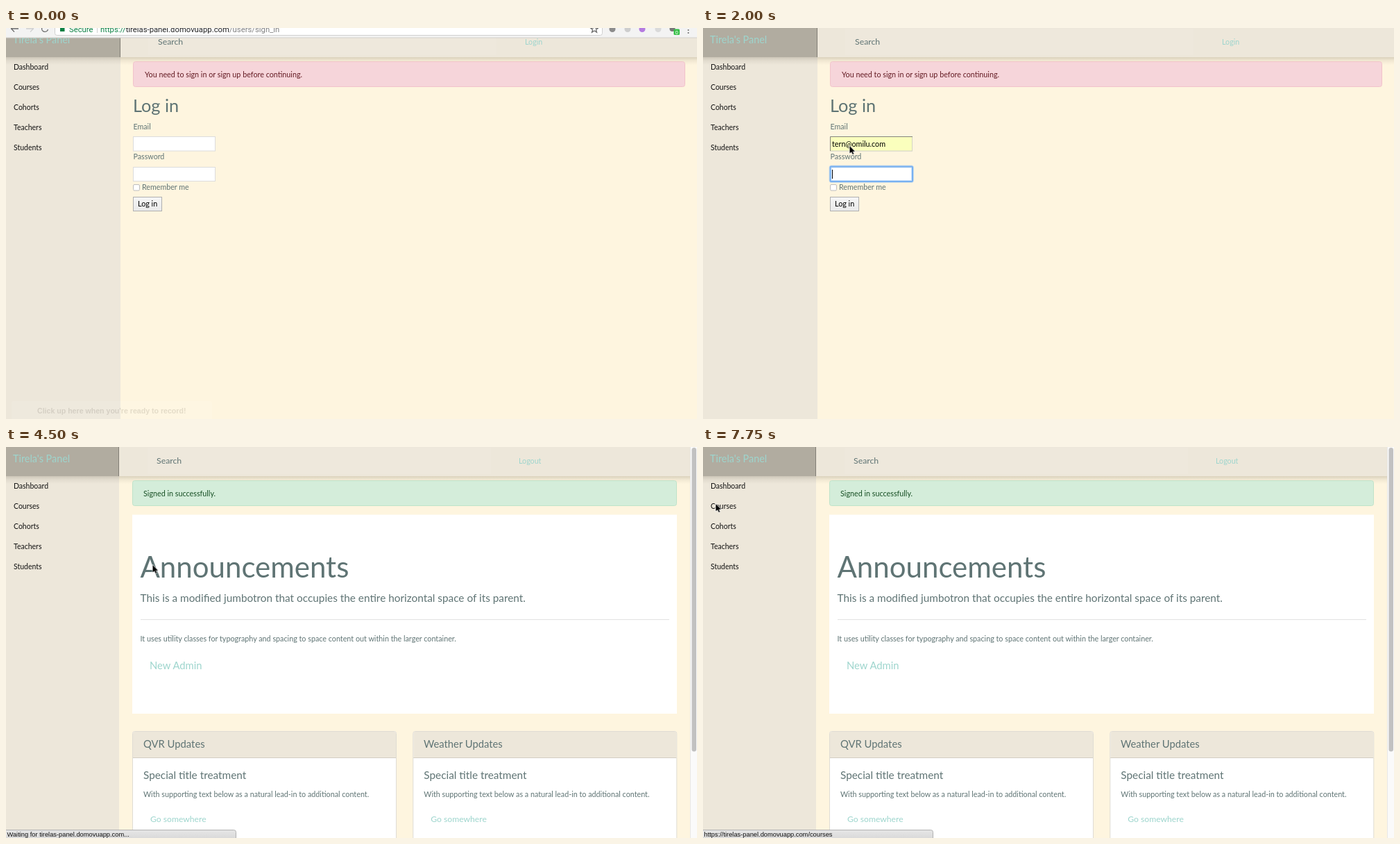
Animation, 996 px wide and 563 px high, one loop 8000 ms. Source, as an HTML page:

```html
<!DOCTYPE html>
<html lang="en">
<head>
<meta charset="utf-8">
<title>Panel sign-in</title>
<style>
html, body { margin: 0; width: 100%; height: 100%; overflow: hidden; background: #fef5df; }
svg { display: block; width: 996px; height: 563px; }
text { font: 10.77px Lato, "Open Sans", sans-serif; fill: #5f7474; white-space: pre; }
.nav text { font-size: 10.5px; fill: #111; }
.label { font-size: 10.7px; }
.dark { fill: #000; }
.link { fill: #9dd5cd; }
.brand { font-size: 14.4px; }
.search { font-size: 12.3px; }
.h1 { font-size: 42px; }
.h2 { font-size: 25.3px; }
.lead { font-size: 15.35px; }
.title { font-size: 14.8px; }
.go { font-size: 12.15px; }
.field { fill: #fff; stroke: #dcdcdc; }
.ring rect { fill: none; stroke: #78b1f1; stroke-width: 2; }
.ring .halo { stroke: #8fc0f5; stroke-width: 4; opacity: .45; }
.caret { fill: #000; }
.menu text { font: bold 10.4px "Liberation Sans", Arial, sans-serif; fill: #000; }
.status text { font: 9.3px "Liberation Sans", Arial, sans-serif; fill: #111; }
.bar text { font: 11.3px Roboto, sans-serif; fill: #222; }
.bar .ok { fill: #0b8043; }
.bar .path { fill: #808080; }
.hint text { font: bold 10.6px "Liberation Sans", Arial, sans-serif; fill: #000; }

/* Hard changes on a 250 ms grid: 3.125% is one step of the 8 s loop. */
.t { animation: 8s step-end infinite; }
.bar { animation-name: bar; }
.hint { animation-name: hint; }
.login { animation-name: login; }
.panel { animation-name: panel; }
.ring-email { animation-name: ring-email; }
.ring-pass { animation-name: ring-pass; }
.caret-email { animation-name: caret-email; }
.typed { animation-name: typed; }
.menu { animation-name: menu; }
.pick { animation-name: pick; }
.filled { animation-name: filled; }
.cover { animation-name: type-pass; }
.caret-pass { animation-name: caret-pass; }
.sent { animation-name: sent; }
.waiting { animation-name: waiting; }
.hover { animation-name: hover; }
.course { animation-name: course; }
.cursor { animation-name: cursor; }

@keyframes bar { 0% { opacity: 1 } 3.125% { opacity: 0 } }
@keyframes hint { 0% { opacity: .1 } 3.125% { opacity: .04 } 6.25% { opacity: 0 } }
@keyframes login { 0% { opacity: 1 } 56.25% { opacity: 0 } }
@keyframes panel { 0% { opacity: 0 } 56.25% { opacity: 1 } }
@keyframes ring-email { 0% { opacity: 0 } 9.375% { opacity: 1 } 25% { opacity: 0 } }
@keyframes ring-pass { 0% { opacity: 0 } 25% { opacity: 1 } }
@keyframes caret-email { 0% { opacity: 0 } 9.375% { opacity: 1 } 15.625% { opacity: 0 } }
@keyframes typed { 0% { opacity: 0 } 15.625% { opacity: 1 } 18.75% { opacity: 0 } }
@keyframes menu { 0% { opacity: 0 } 15.625% { opacity: 1 } 21.875% { opacity: 0 } }
@keyframes pick { 0% { opacity: 0 } 18.75% { opacity: 1 } }
@keyframes filled { 0% { opacity: 0 } 18.75% { opacity: 1 } }
@keyframes type-pass {
  0% { transform: none }
  31.25% { transform: translateX(4.95px) }
  34.375% { transform: translateX(14.85px) }
  37.5% { transform: translateX(19.8px) }
  40.625% { transform: translateX(29.7px) }
  43.75% { transform: translateX(34.6px) }
  46.875% { transform: translateX(39.6px) }
}
@keyframes caret-pass { 0% { opacity: 0 } 25% { opacity: 1 } 46.875% { opacity: 0 } }
@keyframes sent { 0% { opacity: 0 } 50% { opacity: 1 } }
@keyframes waiting { 0% { opacity: 0 } 53.125% { opacity: 1 } 65.625% { opacity: 0 } }
@keyframes hover { 0% { opacity: 0 } 75% { opacity: 1 } }
@keyframes course { 0% { opacity: 0 } 81.25% { opacity: 1 } }
@keyframes cursor {
  0% { opacity: 0; transform: translate(211.5px, 170px) }
  6.25% { opacity: 1; transform: translate(211.5px, 170px) }
  62.5% { opacity: 1; transform: translate(142px, 132px) }
  65.625% { opacity: 1; transform: translate(48px, 80px) }
  68.75% { opacity: 1; transform: translate(23.5px, 65px) }
  71.875% { opacity: 1; transform: translate(23.5px, 62px) }
  75% { opacity: 1; transform: translate(23.5px, 59px) }
  78.125% { opacity: 1; transform: translate(23px, 62px) }
  81.25% { opacity: 1; transform: translate(21px, 72px) }
  84.375% { opacity: 1; transform: translate(19px, 79px) }
  87.5% { opacity: 1; transform: translate(18.5px, 82px) }
}
</style>
</head>
<body>
<svg viewBox="0 0 996 563">
  <defs>
    <linearGradient id="shade" x2="0" y2="1">
      <stop offset="0" stop-color="#6b6350" stop-opacity=".24"/>
      <stop offset=".45" stop-color="#6b6350" stop-opacity=".09"/>
      <stop offset="1" stop-color="#6b6350" stop-opacity="0"/>
    </linearGradient>
    <linearGradient id="button" x2="0" y2="1">
      <stop offset="0" stop-color="#f6f6f6"/>
      <stop offset="1" stop-color="#eaeaea"/>
    </linearGradient>
    <linearGradient id="grey" x2="0" y2="1">
      <stop offset="0" stop-color="#e6e6e6"/>
      <stop offset="1" stop-color="#d9d9d9"/>
    </linearGradient>
    <g id="ring" class="ring">
      <rect class="halo" x="183.5" y="156" width="118.5" height="21.5" rx="2"/>
      <rect x="183.5" y="156" width="118.5" height="21.5" rx="1"/>
    </g>
    <path id="tab" d="M-1 564V551.5H328.5Q331.5 551.5 331.5 554.5V564Z" fill="url(#grey)" stroke="#b2b2b2"/>
    <g id="card">
      <rect x="182.5" y="409.5" width="380" height="170" rx="3" fill="#fff" stroke="#dfdcd4"/>
      <path d="M183 448V412q0-2 2-2h375q2 0 2 2v36Z" fill="#ede7da"/>
      <path d="M183 447.5H562" stroke="#d3cec2"/>
      <text class="lead" x="198" y="478">Special title treatment</text>
      <text x="198" y="503.5">With supporting text below as a natural lead-in to additional content.</text>
      <text class="go link" x="208" y="539.5">Go somewhere</text>
    </g>
  </defs>

  <rect width="996" height="563" fill="#fef5df"/>

  <g class="t login">
    <rect width="165" height="563" fill="#ede7da"/>
    <rect x="165" width="831" height="42" fill="#ede7da"/>
    <rect x="205" y="1" width="502" height="38" fill="#eee8dc"/>
    <rect width="165" height="42" fill="#b1aca0"/>
    <rect x="164" width="1" height="42" fill="#827e76"/>
    <rect y="42" width="996" height="11" fill="url(#shade)"/>
    <text class="search" x="219" y="24">Search</text>
    <text class="label link" x="748" y="24">Login</text>

    <rect x="183.5" y="48.5" width="795" height="36" rx="3" fill="#f6d5da" stroke="#f1c3ca"/>
    <text x="200" y="70.5" style="fill:#641b23">You need to sign in or sign up before continuing.</text>
    <text class="h2" x="183" y="120.5">Log in</text>

    <text class="label" x="183.5" y="145.5">Email</text>
    <rect class="field" x="183.5" y="156.5" width="118" height="20.5"/>
    <text class="label" x="183.5" y="189">Password</text>
    <rect class="field" x="183.5" y="200.5" width="118" height="20"/>
    <rect x="183.5" y="225.5" width="9" height="8.5" rx="1.5" fill="#fff" stroke="#bdbdbd"/>
    <text class="label" x="196" y="233">Remember me</text>
    <rect x="183.5" y="243.5" width="41" height="20" fill="url(#button)" stroke="#b0b0b0"/>
    <text class="dark" x="190" y="257">Log in</text>
    <g class="t sent">
      <rect x="183.5" y="243.5" width="41" height="20" fill="#f4efe4" stroke="#d3cec3"/>
      <text x="190" y="257" style="fill:#85857f">Log in</text>
    </g>

    <path d="M188.6 210.5H224" stroke="#000" stroke-width="3.5" stroke-linecap="round" stroke-dasharray="0 4.95"/>
    <g class="t cover">
      <rect x="186" y="203" width="70" height="15" fill="#fff"/>
      <rect class="t caret caret-pass" x="186" y="204" width="1" height="13"/>
    </g>
    <g class="t ring-pass"><use href="#ring" y="43.5"/></g>

    <g class="t filled">
      <rect x="183.5" y="156.5" width="118" height="20.5" fill="#faffbd" stroke="#d5d5c4"/>
      <path d="M183.5 177V156.5H302" fill="none" stroke="#85857c"/>
      <text class="dark" x="186" y="170.5">tern@omilu.com</text>
    </g>
    <g class="t ring-email"><use href="#ring"/></g>
    <rect class="t caret caret-email" x="186" y="160" width="1" height="13"/>
    <g class="t typed">
      <text class="dark" x="186" y="170.5">te</text>
      <rect class="caret" x="195" y="160" width="1" height="13"/>
    </g>
    <g class="t menu">
      <rect x="183.5" y="178.5" width="118.5" height="37.5" fill="#fff" stroke="#a9cdf0"/>
      <rect class="t pick" x="184" y="179" width="117.5" height="18" fill="#dcdcdc"/>
      <text x="190.5" y="191.5">tern@omilu.com</text>
      <text x="190.5" y="210.5">teacup@omilu.com</text>
    </g>
  </g>

  <g class="t panel">
    <rect width="996" height="563" fill="#fef5df"/>
    <rect width="163" height="563" fill="#ede7da"/>
    <rect x="163" width="823" height="42" fill="#ede7da"/>
    <rect x="204" y="1" width="495" height="38" fill="#eee8dc"/>
    <rect width="163" height="42" fill="#b1aca0"/>
    <rect x="162" width="1" height="42" fill="#827e76"/>
    <rect y="42" width="986" height="11" fill="url(#shade)"/>
    <text class="search" x="217" y="24">Search</text>
    <text class="label link" x="739" y="24">Logout</text>

    <rect x="182.5" y="48.5" width="784" height="36" rx="3" fill="#d4edda" stroke="#bfe3c9"/>
    <text x="198" y="70.5" style="fill:#174f24">Signed in successfully.</text>

    <rect x="182" y="97.5" width="785" height="286.5" fill="#fff"/>
    <text class="h1" x="193.5" y="188">Announcements</text>
    <text class="lead" x="193.5" y="222.5">This is a modified jumbotron that occupies the entire horizontal space of its parent.</text>
    <path d="M194 248.5H956" stroke="#e2e2e2"/>
    <text x="193.5" y="279.5">It uses utility classes for typography and spacing to space content out within the larger container.</text>
    <text class="title link" x="207" y="320">New Admin</text>

    <use href="#card"/>
    <use href="#card" x="404.3"/>
    <text class="title" x="198" y="433">QVR Updates</text>
    <text class="title" x="602" y="433">Weather Updates</text>

    <rect x="986" width="10" height="563" fill="#fafafa"/>
    <path d="M986.5 0V563" stroke="#e8e8e8"/>
    <rect x="988.5" y="1" width="6.5" height="437.5" rx="3.2" fill="#c1c1c1"/>
  </g>

  <text class="brand link" x="10" y="22">Tirela's Panel</text>
  <g class="nav">
    <text x="11" y="60">Dashboard</text>
    <text x="11" y="89">Courses</text>
    <text x="11" y="118">Cohorts</text>
    <text x="11" y="147">Teachers</text>
    <text x="11" y="176">Students</text>
  </g>

  <g class="t status waiting">
    <use href="#tab"/>
    <text x="1.5" y="561">Waiting for tirelas-panel.domovuapp.com...</text>
  </g>
  <g class="t status hover">
    <use href="#tab"/>
    <text x="1.5" y="561">https://tirelas-panel.domovuapp.com</text>
    <text class="t course" x="1.5" y="561"><tspan fill-opacity="0">https://tirelas-panel.domovuapp.com</tspan>/courses</text>
  </g>

  <g class="t hint">
    <rect x="8" y="537" width="289" height="30" rx="4" fill="#fff"/>
    <text x="45" y="555">Click up here when you're ready to record!</text>
  </g>

  <g class="t bar">
    <rect width="996" height="14" fill="#f3f3f3"/>
    <path d="M0 14H996" stroke="#d2d0cb"/>
    <rect x="70.5" y="-12" width="789" height="22.5" rx="3" fill="#fff" stroke="#cfcfcf"/>
    <g fill="none" stroke="#6b6b6b" stroke-width="1.3">
      <path d="M18 1H8M12-3.5 7.5 1 12 5.5"/>
      <path d="M29 1H39M35-3.5 39.5 1 35 5.5" stroke="#d0d0d0"/>
      <path d="M60.5 2A4.5 4.5 0 1 1 57-3.5"/>
      <path d="M848-4 849.5 0 853.5 0 850.4 2.5 851.5 6.3 848 4 844.5 6.3 845.6 2.5 842.5 0 846.5 0Z"/>
    </g>
    <rect x="78" y="-1" width="6.5" height="6" fill="#0b8043"/>
    <text class="ok" x="91" y="5.5">Secure</text>
    <path d="M131.5 0V7" stroke="#d0d0d0"/>
    <text x="136" y="5.5"><tspan class="ok">https://</tspan>tirelas-panel.domovuapp.com<tspan class="path">/users/sign_in</tspan></text>
    <circle cx="874" cy="1.5" r="4.5" fill="#8c8c8c"/>
    <circle cx="896" cy="1.5" r="4.5" fill="#cdcdcd"/>
    <circle cx="917" cy="1.5" r="4.5" fill="#b47ae0"/>
    <circle cx="940" cy="1.5" r="4.5" fill="#dadada"/>
    <circle cx="960.5" cy="1" r="4" fill="#777"/>
    <rect x="962.5" y="1.5" width="8.5" height="8.5" rx="1.5" fill="#35c046"/>
    <text x="964.5" y="9" style="font-size:8px;fill:#fff">0</text>
    <path d="M983.5-1V8" stroke="#666" stroke-width="2" stroke-linecap="round" stroke-dasharray="0 4"/>
  </g>

  <path class="t cursor" d="M0 0V10.5L2.5 8.3 4.2 12 5.9 11.2 4.3 7.7H7.5Z" stroke="#fff" stroke-width="1.2" paint-order="stroke"/>
</svg>
</body>
</html>
```
